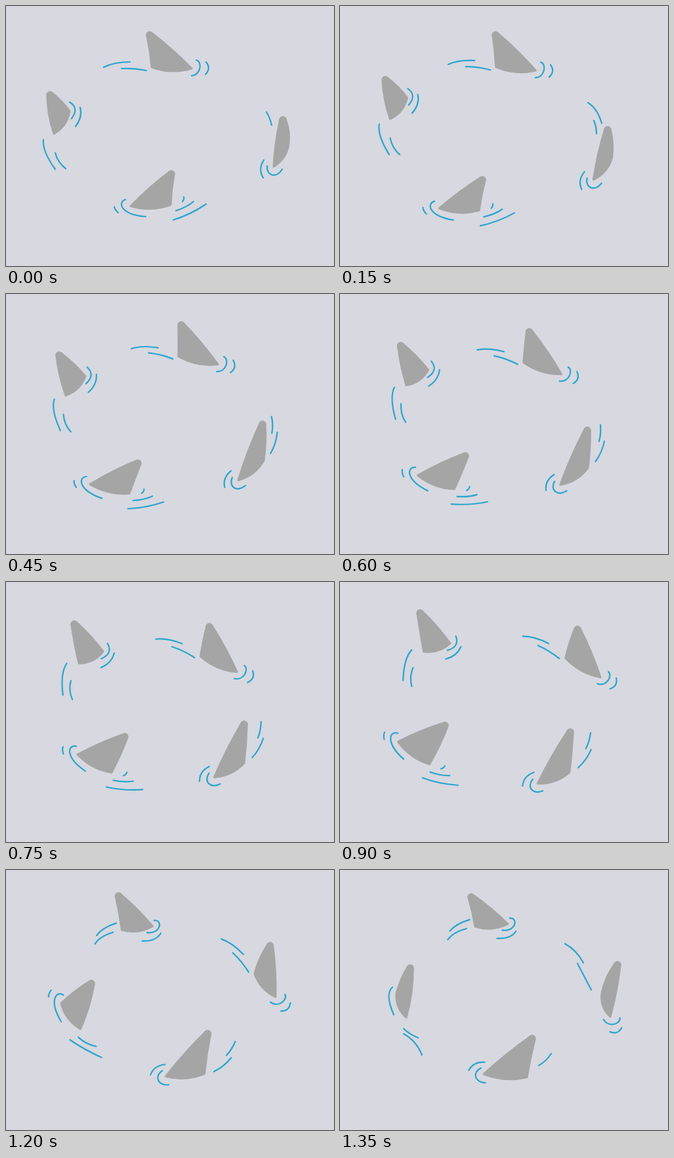
Recreate the animation shown at these times as an HTML page with a canvas. Size 500 px wide and 395 px high, loop 1500 ms.

```html
<!DOCTYPE html>
<html lang="en">
<head>
<meta charset="utf-8">
<title>Circling fins</title>
<style>
  html, body { margin: 0; width: 100%; height: 100%; overflow: hidden; background: #d7d8e0; }
  canvas { display: block; }
</style>
</head>
<body>
<canvas id="stage" width="500" height="395"></canvas>
<script>
const STEP = 150, STEPS = 10;
const PATH_STEPS = [0, 1, 3, 5, 6, 7, 9];
const SHAPE_STEPS = [0, 3, 7, 9];
const ctx = document.getElementById('stage').getContext('2d');

// path: where the tip passes. shape: front x y and back x y, measured from the tip.
// bow and wake: water lines by the step that brings them in; they then ride along with the fin.
const fins = [
  {
    path: [[219, 44], [237, 44], [267, 47], [310, 68], [362, 72], [382, 86], [423, 144]],
    shape: [[64, 51, 3, 49], [56, 60, -4, 48], [28, 77, -23, 42], [-11, 79, -24, 43]],
    bow: { 0: 'M290 82C299 84 298 104 283 106M305 85Q313 95 304 104' },
    wake: {
      0: 'M149 93Q165 85 189 85M176 95Q195 94 214 98',
      9: 'M343 112Q361 122 371 141M362 142L383 182'
    }
  },
  {
    path: [[422, 173], [408, 188], [391, 198], [363, 216], [351, 228], [322, 241], [293, 256]],
    shape: [[-14, 71, 9, 36], [-37, 85, 2, 55], [-54, 76, -2, 63], [-74, 54, -8, 59]],
    bow: { 0: 'M398 243C397 259 413 262 421 248M393 234Q384 248 392 261' },
    wake: {
      0: 'M397 161Q402 169 405 181',
      1: 'M378 147Q392 155 399 178M387 174Q391 184 391 194',
      2: 'M409 174Q413 187 412 199M420 197Q420 215 413 230',
      9: 'M322 279Q314 291 303 297'
    }
  },
  {
    path: [[252, 255], [217, 264], [201, 257], [181, 235], [160, 218], [153, 196], [107, 149]],
    shape: [[-62, 49, -1, 47], [-73, 32, -13, 46], [-71, 22, -27, 63], [-21, 38, -6, 75]],
    bow: {
      0: 'M182 294C170 298 174 317 213 320M165 305Q166 310 171 314',
      9: 'M80 178Q68 188 82 220'
    },
    wake: {
      0: 'M255 325Q281 317 305 301M259 311Q275 306 286 297M271 290Q272 294 269 297',
      7: 'M113 278Q137 289 165 296M125 272Q137 280 154 281',
      9: 'M97 249Q116 259 125 281M97 241Q105 249 119 255'
    }
  },
  {
    path: [[67, 135], [69, 112], [81, 93], [104, 64], [122, 47], [143, 38], [200, 41]],
    shape: [[30, 25, 6, 59], [40, 32, 10, 61], [48, 51, 4, 58], [56, 41, 6, 45]],
    bow: {
      0: 'M97 146Q112 155 100 171M113 154Q117 169 106 183',
      7: 'M193 80C206 78 205 100 183 99M204 99Q197 112 176 112'
    },
    wake: {
      0: 'M57 203Q55 220 75 248M75 223Q79 238 91 247',
      7: 'M138 86Q117 94 109 106M134 100Q114 107 107 119'
    }
  }
];

// Linear blend between the keys on either side of a step
function sample(steps, keys, step) {
  const i = Math.max(1, steps.findIndex(s => s >= step));
  const t = (step - steps[i - 1]) / (steps[i] - steps[i - 1]);
  return keys[i - 1].map((v, k) => v + (keys[i][k] - v) * t);
}

function poseAt({ path, shape }, step) {
  const [x, y] = sample(PATH_STEPS, path, step);
  const [fx, fy, bx, by] = sample(SHAPE_STEPS, shape, step);
  return {
    tip: [x, y],
    front: [x + fx, y + fy],
    back: [x + bx, y + by],
    heading: Math.atan2(fy - by, fx - bx)
  };
}

const offset = (p, n, d) => [p[0] + n[0] * d, p[1] + n[1] * d];

// Unit normal of p-q that points away from o
function outward(p, q, o) {
  const dx = q[0] - p[0], dy = q[1] - p[1], len = Math.hypot(dx, dy);
  const n = [dy / len, -dx / len];
  const side = n[0] * (p[0] - o[0]) + n[1] * (p[1] - o[1]);
  return side < 0 ? [-n[0], -n[1]] : n;
}

function curveTo(p, q, n, bulge) {
  const mid = [(p[0] + q[0]) / 2, (p[1] + q[1]) / 2];
  ctx.quadraticCurveTo(...offset(mid, n, bulge * 2), ...q);
}

function drawFin({ tip, front, back, heading }) {
  const r = 4.2;
  const lead = outward(tip, front, back), trail = outward(tip, back, front);
  const start = offset(tip, lead, r), end = offset(tip, trail, r);
  ctx.fillStyle = ctx.strokeStyle = '#a5a5a5';
  ctx.lineWidth = 3;
  ctx.beginPath();
  ctx.moveTo(...start);
  curveTo(start, front, lead, 1.5);
  curveTo(front, back, outward(front, back, tip), 5);
  // The trailing edge looks rounder when the fin is seen end-on.
  curveTo(back, end, trail, 4 * Math.abs(Math.sin(heading)) - 1);
  ctx.closePath();
  ctx.fill();
  ctx.stroke();
  ctx.beginPath();
  ctx.arc(...tip, r + 1.5, 0, Math.PI * 2);
  ctx.fill();
}

// Turns the lines with the fin's heading around the given corner
function drawWater(fin, lines, corner, step) {
  const from = Math.max(...Object.keys(lines).filter(s => s <= step));
  const now = poseAt(fin, step), base = poseAt(fin, from);
  ctx.save();
  ctx.translate(...now[corner]);
  ctx.rotate(now.heading - base.heading);
  ctx.translate(-base[corner][0], -base[corner][1]);
  ctx.strokeStyle = '#2ba5cc';
  ctx.lineWidth = 2.2;
  ctx.stroke(new Path2D(lines[from]));
  ctx.restore();
}

function draw(step) {
  ctx.fillStyle = '#d7d8e0';
  ctx.fillRect(0, 0, 500, 395);
  ctx.lineCap = ctx.lineJoin = 'round';
  for (const fin of fins) {
    drawFin(poseAt(fin, step));
    drawWater(fin, fin.bow, 'front', step);
    drawWater(fin, fin.wake, 'back', step);
  }
}

const origin = performance.now();
function tick() {
  const elapsed = Math.max(0, performance.now() - origin);
  draw(Math.floor(elapsed / STEP) % STEPS);
  requestAnimationFrame(tick);
}
tick();
</script>
</body>
</html>
```
